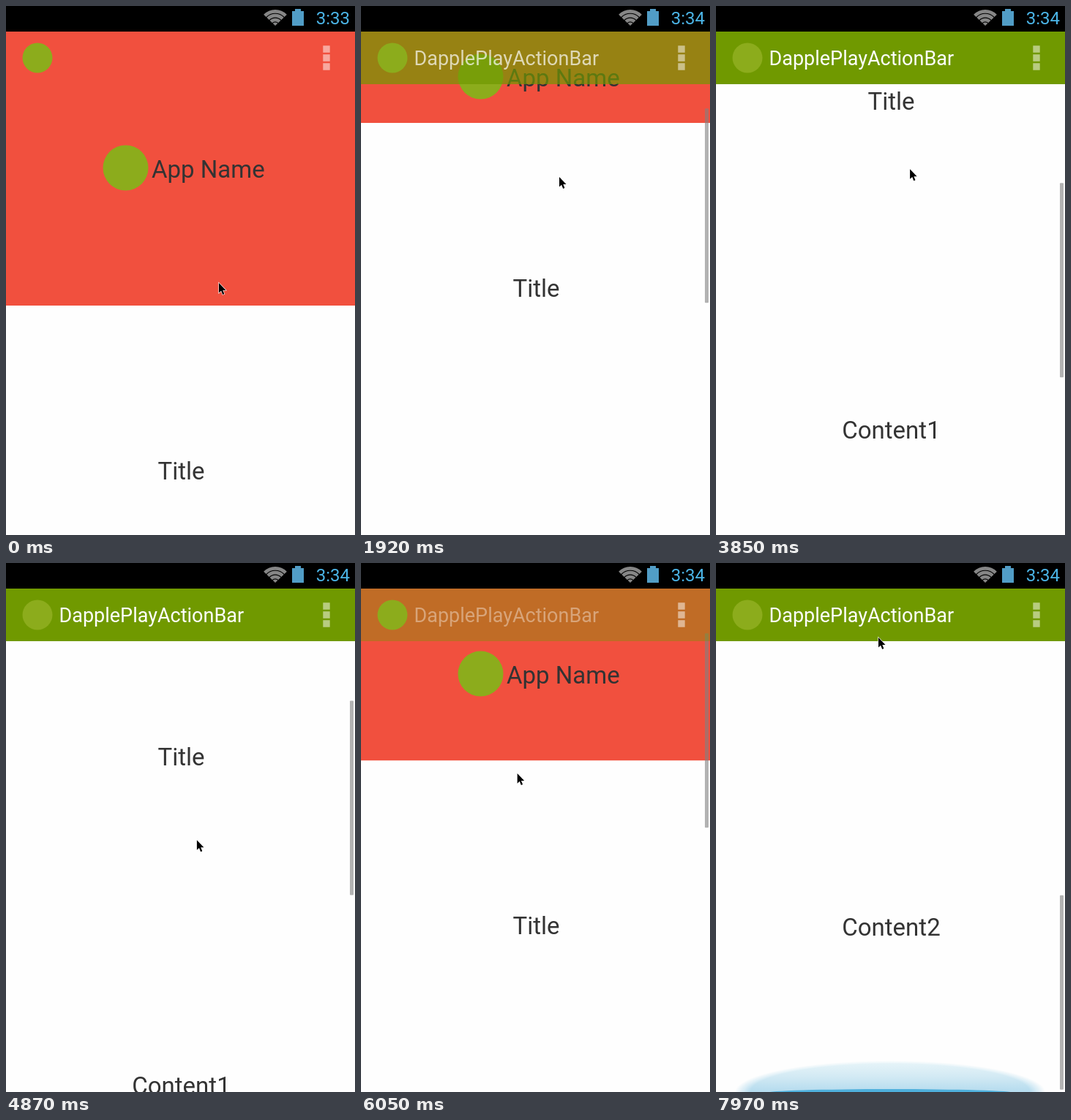
Animation of 477x724 px, one loop 8 s. Source, as an HTML page:

```html
<!DOCTYPE html>
<html lang="en">
<head>
<meta charset="utf-8">
<title>Fading action bar</title>
<style>
  html, body { margin: 0; width: 100%; height: 100%; overflow: hidden; background: #fefefe; }
  svg { display: block; width: 477px; height: 724px; font-family: Roboto, sans-serif; }
  .label { font-size: 33px; fill: #333; }
  .mid { text-anchor: middle; }
</style>
</head>
<body>
<svg viewBox="0 0 477 724">
  <defs>
    <clipPath id="headerClip"><rect id="headerArea" width="477" height="375" y="35"/></clipPath>
    <clipPath id="listClip"><rect width="477" height="689" y="35"/></clipPath>
    <linearGradient id="pullUp" x1="0" y1="0" x2="0" y2="1">
      <stop offset="0" stop-color="#e9f5f9"/>
      <stop offset=".25" stop-color="#d3eaf4"/>
      <stop offset=".5" stop-color="#b4dbee"/>
    </linearGradient>
    <radialGradient id="soft">
      <stop offset=".9" stop-color="#fff"/>
      <stop offset="1" stop-color="#fff" stop-opacity="0"/>
    </radialGradient>
    <mask id="softEdge" maskContentUnits="objectBoundingBox">
      <circle cx=".5" cy=".5" r=".5" fill="url(#soft)"/>
    </mask>
  </defs>

  <rect width="477" height="724" fill="#fefefe"/>

  <g clip-path="url(#listClip)">
    <g clip-path="url(#headerClip)">
      <rect y="35" width="477" height="375" fill="#f1503e"/>
      <g id="brand">
        <circle cx="163.5" cy="221.5" r="31" fill="#8cac1c"/>
        <text class="label" x="199" y="234.7">App Name</text>
      </g>
    </g>
    <g id="rows" class="label mid"></g>

    <g id="topGlow">
      <ellipse cx="238" cy="35" rx="290" ry="58" fill="#6080a0" opacity=".1"/>
      <ellipse cx="248" cy="35" rx="180" ry="55" fill="#6080a0" opacity=".13"/>
      <ellipse cx="240" cy="35" rx="163" ry="7" fill="#5f7f9f" opacity=".55"/>
    </g>
    <g id="bottomGlow">
      <ellipse cx="238" cy="724" rx="212" ry="43" fill="url(#pullUp)" mask="url(#softEdge)"/>
      <ellipse cx="238" cy="725" rx="168" ry="5" fill="#4fb0dc"/>
    </g>
    <rect id="thumb" x="470" width="5" height="266" rx="1" fill="#808080"/>
  </g>

  <rect id="bar" y="35" width="477" height="72" fill="#709900"/>
  <text id="barTitle" x="72.5" y="81" font-size="27" fill="#fff">DapplePlayActionBar</text>
  <circle cx="43" cy="71" r="20.5" fill="#8cac1c"/>
  <path d="M438 54.3v34" stroke="#fff" stroke-width="9.4" stroke-dasharray="9.4 2.6" opacity=".5"/>

  <rect width="477" height="35" fill="#000"/>
  <g id="wifi" fill="none" stroke="#868686" stroke-width="4.6"></g>
  <path d="M395 4h8v3h4v20h-16v-20h4z" fill="#519dc6"/>
  <text id="clock" x="423.7" y="25" font-size="24" fill="#4bb4e6"></text>

  <path id="pointer" d="M0 0V13.6L3.1 10.8L5.2 16L7.4 15L5.3 10H9.5Z"
        fill="#000" stroke="#fff" stroke-width="1.2" paint-order="stroke"/>
</svg>

<script>
  const LOOP = 8000, STEP = 147.5, MAX_SCROLL = 1038, HEADER = 375, FULL_PULL = 31;

  const steady = p => p;
  const slowing = p => 1 - (1 - p) ** 2;
  const speeding = p => p * p;

  // The list follows the pointer during each drag; a gain above 1 is a fling.
  const rest = { end: 0, to: [291, 379] };
  const drags = [
    { start: 4, end: 13, from: [273, 484], to: [271, 234], ease: steady, gain: 1 },
    { start: 17, end: 26.5, from: [267, 479], to: [265, 209], ease: steady, gain: 1 },
    { start: 28, end: 37, from: [262, 230], to: [260, 498.6], ease: steady, gain: 1 },
    { start: 39, end: 48, from: [218, 176.4], to: [207, 459], ease: slowing, gain: 1 },
    { start: 48, end: 54, from: [207, 459], to: [222, 102], ease: speeding, gain: 3 }
  ];

  const el = id => document.getElementById(id);
  const move = (id, x, y) => el(id).setAttribute('transform', `translate(${x} ${y})`);
  const fade = (id, value) => el(id).setAttribute('opacity', value);
  const clamp = (v, max) => Math.max(0, Math.min(max, v));
  const mix = (a, b, p) => a.map((v, i) => v + (b[i] - v) * p);

  function poseAt(step) {
    let scroll = 0, over = 0, pointer = rest.to, last = rest;
    for (const drag of drags) {
      const { start, end, from, to, ease, gain } = drag;
      if (step < start) {
        pointer = mix(last.to, from, (step - last.end) / (start - last.end));
        return { scroll, over: 0, pointer };
      }
      pointer = mix(from, to, ease(clamp((step - start) / (end - start), 1)));
      const pulled = scroll + (from[1] - pointer[1]) * gain;
      scroll = clamp(pulled, MAX_SCROLL);
      over = pulled - scroll;
      if (step <= end) break;
      last = drag;
    }
    return { scroll, over, pointer };
  }

  el('rows').innerHTML = ['Title', 'Content1', 'Content2']
    .map((label, i) => `<text x="239.5" y="${648 + 450 * i}">${label}</text>`).join('');

  el('wifi').innerHTML = [0, 1, 2, 3].map(i => {
    const r = 2.3 + 5.8 * i, dx = r * .72, y = 27 - r * .69;
    return `<path d="M${368 - dx} ${y}A${r} ${r} 0 0 1 ${368 + dx} ${y}"/>`;
  }).join('');

  function draw(time) {
    const step = Math.floor(time % LOOP / STEP);
    const { scroll, over, pointer } = poseAt(step);
    const pullDown = clamp(-over / FULL_PULL, 1);
    const shown = clamp(scroll / 362, 1);

    el('headerArea').setAttribute('height', Math.max(0, HEADER - scroll));
    move('brand', 0, -scroll / 2);
    move('rows', 0, -scroll);
    fade('bar', shown);
    fade('barTitle', shown);
    el('thumb').setAttribute('y', 40.5 + scroll * .399);
    fade('thumb', step < drags[0].start ? 0 : .6 - .25 * pullDown);
    fade('topGlow', pullDown);
    fade('bottomGlow', clamp(over / FULL_PULL, 1));
    el('clock').textContent = step < 13 ? '3:33' : '3:34';
    move('pointer', ...pointer);
  }

  const begin = performance.now();
  function tick() {
    draw(performance.now() - begin);
    requestAnimationFrame(tick);
  }
  tick();
</script>
</body>
</html>
```
